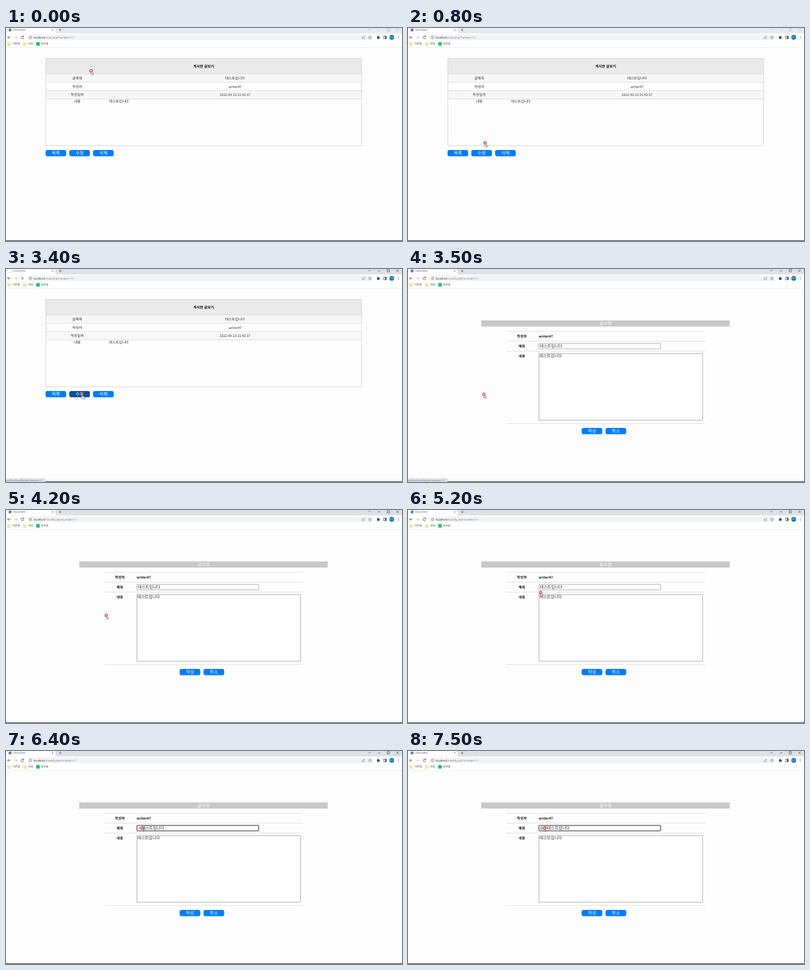
These frames come from a looping animation (600 by 323 pixels, 8 s). An HTML page:

```html
<!DOCTYPE html>
<html lang="ko">
<head>
<meta charset="utf-8">
<title>Document</title>
<style>
html, body { margin: 0; width: 100%; height: 100%; overflow: hidden; background: #fdfdfd; }
svg { display: block; width: 100vw; height: 100vh; }
text { font-family: "Noto Sans CJK KR", "Noto Sans CJK", "Noto Sans", sans-serif; text-rendering: geometricPrecision; white-space: pre; }
.ui { font-family: "Open Sans", "Noto Sans", "Noto Sans CJK KR", sans-serif; }
</style>
</head>
<body>
<svg id="stage" viewBox="0 0 600 323" xmlns="http://www.w3.org/2000/svg"></svg>
<script>
const LOOP = 8000;
const stage = document.getElementById('stage');
const BLUE = '#007bff', BLUE_HOVER = '#06509b', INK = '#2b2b2b';
const FIELD_EDGE = '#969696', ROW_EDGE = '#dcdcdc';

function add(parent, tag, attrs = {}, content) {
  const el = document.createElementNS('http://www.w3.org/2000/svg', tag);
  for (const key in attrs) el.setAttribute(key, attrs[key]);
  if (content !== undefined) el.textContent = content;
  parent.appendChild(el);
  return el;
}
const group = (parent, attrs) => add(parent, 'g', attrs);
const rect = (parent, x, y, width, height, fill, more) =>
  add(parent, 'rect', { x, y, width, height, fill, ...more });
const path = (parent, d, stroke, width = 0.7, more) =>
  add(parent, 'path', { d, fill: 'none', stroke, 'stroke-width': width, ...more });
const circle = (parent, cx, cy, r, fill, more) =>
  add(parent, 'circle', { cx, cy, r, fill, ...more });
// y is the visual middle of the line
const label = (parent, x, y, size, str, more) =>
  add(parent, 'text', { x, y: y + size * 0.36, 'font-size': size, fill: INK, ...more }, str);
const MID = { 'text-anchor': 'middle' };
const BOLD = { 'font-weight': 700, fill: '#111' };
const show = (el, on) => el.setAttribute('visibility', on ? 'visible' : 'hidden');

function button(parent, x, y, str) {
  const box = rect(parent, x, y, 31.3, 9.5, BLUE, { rx: 3.1 });
  label(parent, x + 15.65, y + 4.6, 6.9, str, { ...MID, fill: '#fff' });
  return box;
}

const BODY = '테스트입니다', WRITER = 'writer47';

// Reading page
const readPage = group(stage);
rect(readPage, 60, 46, 479, 24, '#eaeaea');
rect(readPage, 60, 70, 479, 12, '#f7f7f7');
rect(readPage, 60, 95, 479, 12, '#f7f7f7');
path(readPage, 'M60 69.5H539M60 82.3H539M60 94.8H539M60 107.5H539', ROW_EDGE, 0.8);
rect(readPage, 60.2, 46.2, 478.6, 132.6, 'none', { stroke: '#d3d3d3', 'stroke-width': 0.8 });
label(readPage, 299.5, 58.2, 5.4, '게시판 글보기', { ...MID, ...BOLD });
[['글제목', 76, BODY, 5.4], ['작성자', 88.7, WRITER, 5], ['작성일자', 101.2, '2022-09-13 21:42:37', 5]]
  .forEach(([name, y, value, size]) => {
    label(readPage, 108, y, 5.4, name, MID);
    label(readPage, 347, y, size, value, MID);
  });
label(readPage, 108, 111.5, 5.4, '내용', MID);
label(readPage, 156.3, 111.5, 5.4, BODY);
button(readPage, 59.9, 185, '목록');
const editButton = button(readPage, 95.9, 185, '수정');
button(readPage, 132, 185, '삭제');

// Editing page
const editPage = group(stage);
rect(editPage, 111, 78, 376.5, 9.3, '#c8c8c8');
label(editPage, 299.5, 82.7, 6.8, '글수정', { ...MID, fill: '#fff' });
path(editPage, 'M149 94.5H450M149 109.4H450M149 124.5H450M149 234.4H450', ROW_EDGE, 0.7);
label(editPage, 172.5, 102, 5.4, '작성자', { ...MID, ...BOLD });
label(editPage, 172.5, 117, 5.4, '제목', { ...MID, ...BOLD });
label(editPage, 172.5, 132, 5.4, '내용', { ...MID, ...BOLD });
label(editPage, 198, 102, 5.1, WRITER, BOLD);
const titleBox = rect(editPage, 198.4, 112.9, 184.4, 8.2, '#fff', { rx: 0.4 });
const titleText = label(editPage, 199.8, 117.1, 6.15, BODY);
rect(editPage, 198.4, 128.2, 247.8, 101, '#fff', { stroke: FIELD_EDGE, 'stroke-width': 0.7 });
label(editPage, 199.3, 132.2, 6.15, BODY);
button(editPage, 263.1, 241, '작성');
button(editPage, 299.3, 241, '취소');

// Browser frame
const chrome = group(stage);
const tabStrip = rect(chrome, 0, 0, 600, 8.6);
rect(chrome, 0, 8.5, 600, 21.5, '#fff');
path(chrome, 'M0 8.6V0H73Q75 0 75 3V6.5Q75 8.6 77 8.6Z', 'none', 0, { style: 'fill:#fff' });
label(chrome, 11.3, 3.1, 3.75, 'Document', { class: 'ui', fill: '#45484c' });
path(chrome, 'M69.4 1.8l2.4 2.4m0-2.4l-2.4 2.4M80 3h4.2M82.1 .9v4.2', '#50545a', 0.6);
const windowButtons = path(chrome,
  'M549 1.6l1.6 1.6 1.6-1.6M563.4 2.8h3.6M577.6 1h3.4v3.4h-3.4zM591.4 .9l3.6 3.6m0-3.6l-3.6 3.6', '#333', 0.6);

const favicon = group(chrome);
circle(favicon, 6.2, 3, 2.3, '#50545a');
path(favicon, 'M4.6 2.2q1.5-.9 1.7.5t1.6.6M5.6 4.7l1.1-.9', '#fff', 0.6);
const spinner = path(chrome, 'M6.3 .9A2.2 2.2 0 0 0 6.3 5.3', '#a9adb3', 0.6);

path(chrome, 'M6.8 14.2H2.4m2-2l-2 2 2 2', '#4b4f54', 0.8);
path(chrome, 'M12.4 14.2h4.4m-2-2l2 2-2 2', '#b9bcc0', 0.8);
const reload = path(chrome, 'M26.6 12.9A2.1 2.1 0 1 0 26.9 15M27 11.6v1.8h-1.8', '#4b4f54', 0.8);
const stop = path(chrome, 'M23.2 12.5l3.4 3.4m0-3.4l-3.4 3.4', '#4b4f54', 0.8);

rect(chrome, 31.5, 10, 525, 8.6, '#f1f3f4', { rx: 4.3 });
circle(chrome, 37.2, 14.2, 1.9, 'none', { stroke: '#5f6368', 'stroke-width': 0.5 });
path(chrome, 'M37.2 13.9v1.4M37.2 12.9v.5', '#5f6368', 0.5);
const address = label(chrome, 42, 14.1, 4.15, '', { class: 'ui' });
add(address, 'tspan', { fill: '#202124' }, 'localhost');
const addressPath = add(address, 'tspan', { fill: '#73777c' });

path(chrome, 'M540.4 13.4h-.9v2.7h4v-1M541 14.9q.2-2 2.6-2m-1-1l1 1-1 1', '#5f6368', 0.5);
path(chrome, 'M551.5 11.9l.7 1.6 1.7.1-1.3 1.1.4 1.7-1.5-.9-1.5.9.4-1.7-1.3-1.1 1.7-.1z', '#5f6368', 0.5);
rect(chrome, 562.2, 13, 3.4, 3.4, '#45484c', { rx: 0.5 });
circle(chrome, 563.8, 12.7, 0.9, '#45484c');
circle(chrome, 565.8, 14.6, 0.9, '#45484c');
rect(chrome, 572.2, 12.2, 4, 4, 'none', { stroke: '#45484c', 'stroke-width': 0.7 });
rect(chrome, 574.4, 12.2, 1.8, 4, '#45484c');
circle(chrome, 584.5, 14.2, 3.6, '#0878b8');
label(chrome, 584.5, 14.2, 2.9, '회원', { ...MID, fill: '#d5eaf6' });
[12.5, 14.2, 15.9].forEach(y => circle(chrome, 594.8, y, 0.5, '#45484c'));

const folder = x => path(chrome, `M${x} 21.7h2l.7.8h1.7v4.2h-4.4z`, '#f5d37a', 0.4, { style: 'fill:#fde293' });
folder(2.2); folder(26.3);
rect(chrome, 45.8, 21.4, 5.2, 5.2, '#03c75a');
[[9.6, '기본함'], [33.4, '과일'], [53, '모라빛']].forEach(([x, name]) =>
  label(chrome, x, 24, 4.1, name, { fill: '#3c4043' }));
path(chrome, 'M0 29.7H600', '#e3e5e8', 0.6);
rect(chrome, 0, 322, 600, 1, '#484b50');

const status = group(stage);
rect(status, -2, 318, 61.5, 7, '#dee1e6', { stroke: '#c3c6cb', 'stroke-width': 0.5 });
label(status, -1.3, 321.2, 3.6, 'localhost/modify.php?number=11', { class: 'ui', fill: '#5f6368' });

// Pointer with its highlight ring
const pointer = group(stage);
const shapes = {
  arrow: path(pointer, 'M0 0V5.4L1.3 4.3 2.3 6.4 3.2 6 2.3 4H4Z', '#444', 0.5, { style: 'fill:#fff' }),
  hand: path(pointer, 'M-.4 0q.7-.7 1.2 0V2.8L3.6 3.4Q4.4 3.7 4.2 4.8L3.6 7.2H.8L-1.4 4.4Q-1.3 3.4-.4 4Z', '#222', 0.5, { style: 'fill:#fff' }),
  beam: path(pointer, 'M1 -.9h2M2 -.9v5.6M1 4.7h2', '#333', 0.5)
};
circle(pointer, 0, 0, 1.9, '#fff', { 'fill-opacity': 0.5, stroke: '#dc3a42', 'stroke-width': 1.2 });

// time, x, y
const route = [
  [0, 129, 65], [100, 129, 65], [1000, 115, 190], [3800, 115, 190], [4700, 203, 117],
  [4900, 202, 117], [5100, 202, 117], [5200, 201, 125], [5600, 200, 127],
  [5750, 200, 127], [5900, 174, 117], [6000, 174, 117], [6200, 206.5, 117], [LOOP, 206.5, 117]
];
// time, text typed in front of the title
const typed = [[0, ''], [6400, 'ㅅ'], [6900, '수'], [7100, '숮'], [7500, '수저']];

function pointerAt(t) {
  const i = route.findIndex(k => k[0] > t);
  const [t0, x0, y0] = route[i - 1], [t1, x1, y1] = route[i];
  const p = (t - t0) / (t1 - t0), e = p * p * (3 - 2 * p);
  return [x0 + (x1 - x0) * e, y0 + (y1 - y0) * e];
}

function render(t) {
  const editing = t >= 3500;
  const windowActive = t >= 1300;
  const loading = windowActive && !editing;
  const hover = t >= 1000 && !editing;
  const focused = t >= 5900;

  show(readPage, !editing);
  show(editPage, editing);
  show(favicon, !loading);
  show(spinner, loading);
  show(reload, !loading);
  show(stop, loading);
  show(status, t >= 1000 && t < 4000);
  tabStrip.setAttribute('fill', windowActive ? '#dee1e6' : '#e7eaed');
  windowButtons.setAttribute('stroke', windowActive ? '#333' : '#b4b7bb');
  spinner.setAttribute('transform', `rotate(${-Math.floor(t / 100) * 36} 6.3 3.1)`);
  addressPath.textContent = `/${editing ? 'modify' : 'read'}.php?number=11`;
  editButton.setAttribute('fill', hover ? BLUE_HOVER : BLUE);

  titleBox.setAttribute('stroke', focused ? '#333' : FIELD_EDGE);
  titleBox.setAttribute('stroke-width', focused ? 1 : 0.7);
  titleText.textContent = typed.filter(k => k[0] <= t).pop()[1] + BODY;

  const [x, y] = pointerAt(t);
  pointer.setAttribute('transform', `translate(${x} ${y})`);
  const inField = editing && x > 198 && x < 446 && (y > 113 && y < 121 || y > 128 && y < 229);
  const kind = hover ? 'hand' : inField ? 'beam' : 'arrow';
  for (const name in shapes) show(shapes[name], name === kind);
}

const start = performance.now();
function tick() {
  render((performance.now() - start) % LOOP);
  requestAnimationFrame(tick);
}
tick();
</script>
</body>
</html>
```
